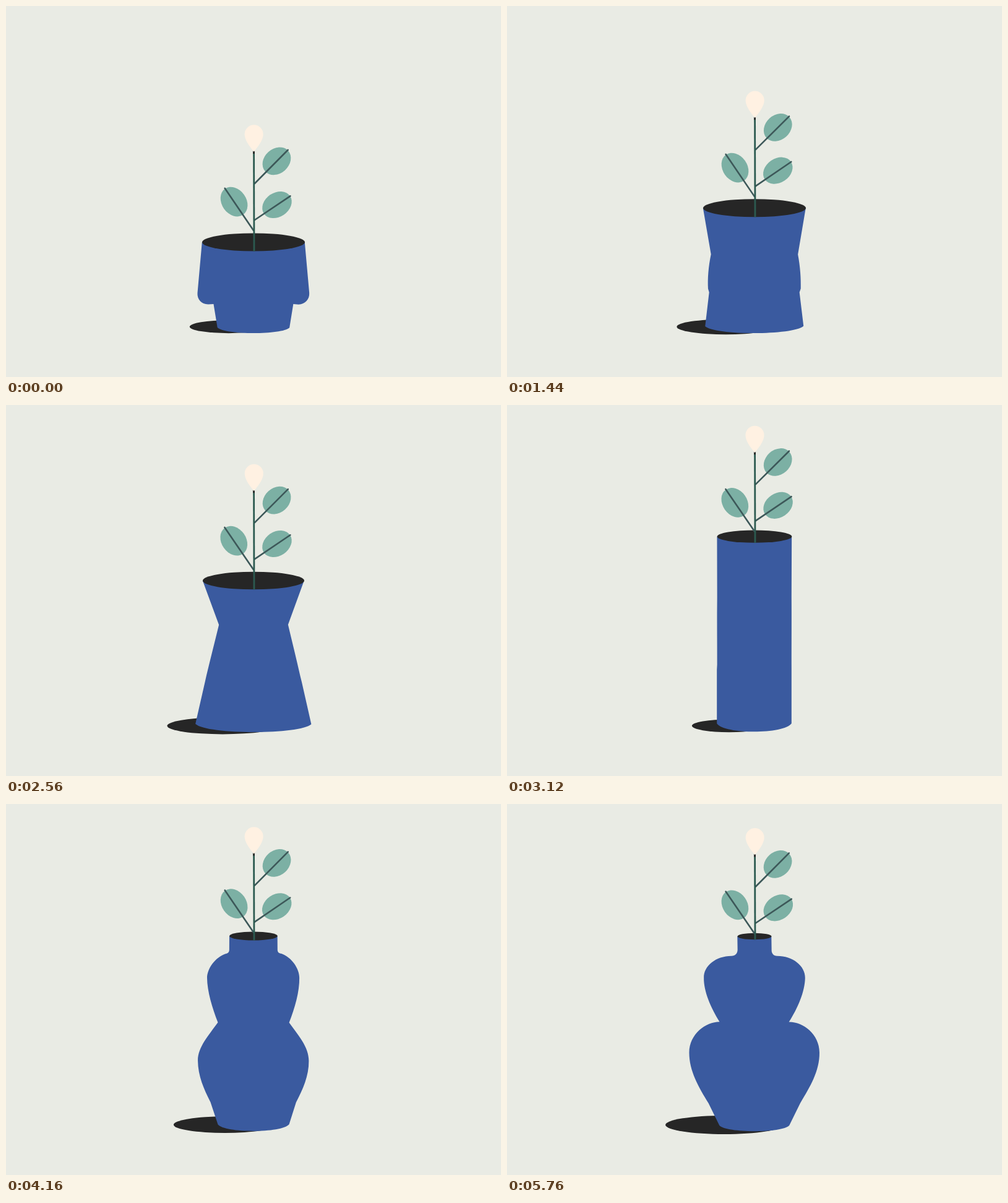
An HTML page with a canvas that plays this animation: 800 px wide and 600 px high, repeating every 5.84 s.

```html
<!DOCTYPE html>
<html lang="en">
<head>
<meta charset="utf-8">
<title>Growing vase</title>
<style>
  html, body { margin: 0; width: 100%; height: 100%; overflow: hidden; background: #e9ebe4; }
  canvas { display: block; }
</style>
</head>
<body>
<canvas id="stage" width="800" height="600"></canvas>
<script>
const ctx = document.getElementById('stage').getContext('2d');
const LOOP = 5840, STEP = 80, CX = 399.8, WOBBLE = 0.35;
const BLUE = '#3a5a9f', BLACK = '#262626', LEAF = '#7cb0a4',
      STEM = '#2c5a50', VEIN = '#3d5859', PETAL = '#fff1e2', PAPER = '#e9ebe4';

// steps where the drawing is held from the one before
const HELD = [240, 560, 2000, 2160, 2480, 3440, 5040, 5200, 5360];
const MOVES = [[1000, 1795], [2470, 3140], [3680, 4480]];

// half profiles as [half width, y], rim to base
const pot = [[83, 382], [90.3, 464], [91, 474], [84, 482.3], [73, 482.3], [64.3, 482.3], [58, 520]];
const waisted = [[83, 287.3], [55.8, 357.4], [62.4, 384], [69.5, 411], [76.5, 439], [79.3, 449], [95, 516]];
const tubeAt = ys => ys.map(y => [60.3, y]);
const tube = tubeAt([212.5, 310, 345, 382, 420, 428, 515]);
const tubeFine = tubeAt([212.5, 234, 234, 234, 234, 252, 274, 281, 303, 330, 355,
                         415, 432, 440, 455, 468, 479, 515]);
const vase = [[27.5, 214], [27.5, 236], [27.5, 242], [31, 246], [37, 246],
              [62, 246], [82, 262], [82, 281], [82, 303], [70, 330], [56, 352.5],
              [78, 352], [105.5, 372], [105.5, 402], [105.5, 432], [90, 458], [74, 484], [56.3, 520]];

const SHAPES = [
  { from: pot, to: waisted, cmds: 'LCLL' },
  { from: waisted, to: tube, cmds: 'LCLL' },
  { from: tubeFine, to: vase, cmds: 'LCCCCCL' }
];

// rim height, plant lift, base sag, shadow left / width radius / height radius
const POSES = [
  [14.5, 0, 9, 296.5, 63, 10.5],
  [14.5, -94, 13, 259, 91, 13.7],
  [10.2, -159, 13.3, 299, 60, 10.4],
  [5.2, -153.5, 9.3, 256, 95, 15]
];

const mix = (a, b, p) => a + (b - a) * p;

function ease(t, [start, end]) {
  const u = Math.min(1, Math.max(0, (t - start) / (end - start)));
  return (1 - Math.cos(Math.PI * u)) / 2;
}

let seed = 0;
function jitter() {
  const v = Math.sin(++seed * 12.9898) * 43758.5453;
  return (v - Math.floor(v) - 0.5) * 2 * WOBBLE;
}

function ellipse(x, y, rx, ry, color, turn = 0) {
  ctx.fillStyle = color;
  ctx.beginPath();
  ctx.ellipse(x, y, rx, ry, turn, 0, Math.PI * 2);
  ctx.fill();
}

function line(x1, y1, x2, y2, color, width) {
  ctx.strokeStyle = color;
  ctx.lineWidth = width;
  ctx.beginPath();
  ctx.moveTo(x1, y1);
  ctx.lineTo(x2, y2);
  ctx.stroke();
}

function trace(points, cmds) {
  let i = 1;
  for (const c of cmds) {
    if (c === 'L') ctx.lineTo(...points[i++]);
    else ctx.bezierCurveTo(...points[i++], ...points[i++], ...points[i++]);
  }
}

function drawBody(profile, cmds, sag) {
  const side = dir => profile.map(([w, y], i) =>
    [CX + dir * w + (i ? jitter() : 0), y + (i ? jitter() : 0)]);
  const right = side(1), left = side(-1).reverse();
  const [w, y] = profile[profile.length - 1];
  const low = y + sag * 4 / 3;
  ctx.fillStyle = BLUE;
  ctx.beginPath();
  ctx.moveTo(...right[0]);
  trace(right, cmds);
  ctx.bezierCurveTo(CX + w * 0.8, low, CX - w * 0.8, low, ...left[0]);
  trace(left, [...cmds].reverse());
  ctx.closePath();
  ctx.fill();
}

function drawLeaf(x, y, a, b, degrees, rootX, rootY, tipX, tipY) {
  const dx = jitter(), dy = jitter();
  ellipse(x + dx, y + dy, a, b, LEAF, degrees * Math.PI / 180);
  line(rootX, rootY, tipX + dx, tipY + dy, VEIN, 2.6);
}

function drawPlant(lift, rimBottom) {
  ctx.save();
  ctx.translate(0, lift);
  ctx.lineCap = 'round';
  drawLeaf(437.8, 251, 25, 20, -42, 402, 287, 456, 233);
  drawLeaf(438, 321.2, 25.5, 19.5, -34, 402, 346, 459.5, 307);
  drawLeaf(368.4, 316.7, 25.6, 19.8, 55, 400, 363, 353.5, 295);
  ctx.lineCap = 'butt';
  line(400.6, 235, 401, rimBottom - lift, STEM, 2.8);
  line(400.6, 234.5, 400.6, 239, BLACK, 2.8);
  ctx.translate(400.7 + jitter() * 0.6, jitter() * 0.6);
  ctx.fillStyle = PETAL;
  ctx.beginPath();
  ctx.moveTo(0, 236);
  ctx.bezierCurveTo(-3.5, 231, -15, 219, -15, 207.5);
  ctx.arc(0, 207.5, 15, Math.PI, 0);
  ctx.bezierCurveTo(15, 219, 3.5, 231, 0, 236);
  ctx.fill();
  ctx.restore();
}

function draw(time) {
  let t = Math.floor(time / STEP) * STEP;
  if (HELD.includes(t)) t -= STEP;
  seed = t / STEP * 97;

  const stage = t < 2100 ? 0 : t < 3400 ? 1 : 2;
  const p = ease(t, MOVES[stage]);
  const { from, to, cmds } = SHAPES[stage];
  const profile = from.map(([w, y], i) => [mix(w, to[i][0], p), mix(y, to[i][1], p)]);
  const [rimH, lift, sag, left, rx, ry] = POSES[stage].map((v, i) => mix(v, POSES[stage + 1][i], p));
  const [rimW, rimY] = profile[0];

  ctx.fillStyle = PAPER;
  ctx.fillRect(0, 0, 800, 600);
  ellipse(left + rx + jitter(), 518.8 + jitter() * 0.5, rx, ry, BLACK);
  drawBody(profile, cmds, sag);
  ellipse(CX + 0.2, rimY, rimW, rimH, BLACK);
  drawPlant(lift, rimY + rimH);
}

const begin = performance.now();
function tick() {
  draw((performance.now() - begin) % LOOP);
  requestAnimationFrame(tick);
}
tick();
</script>
</body>
</html>
```
